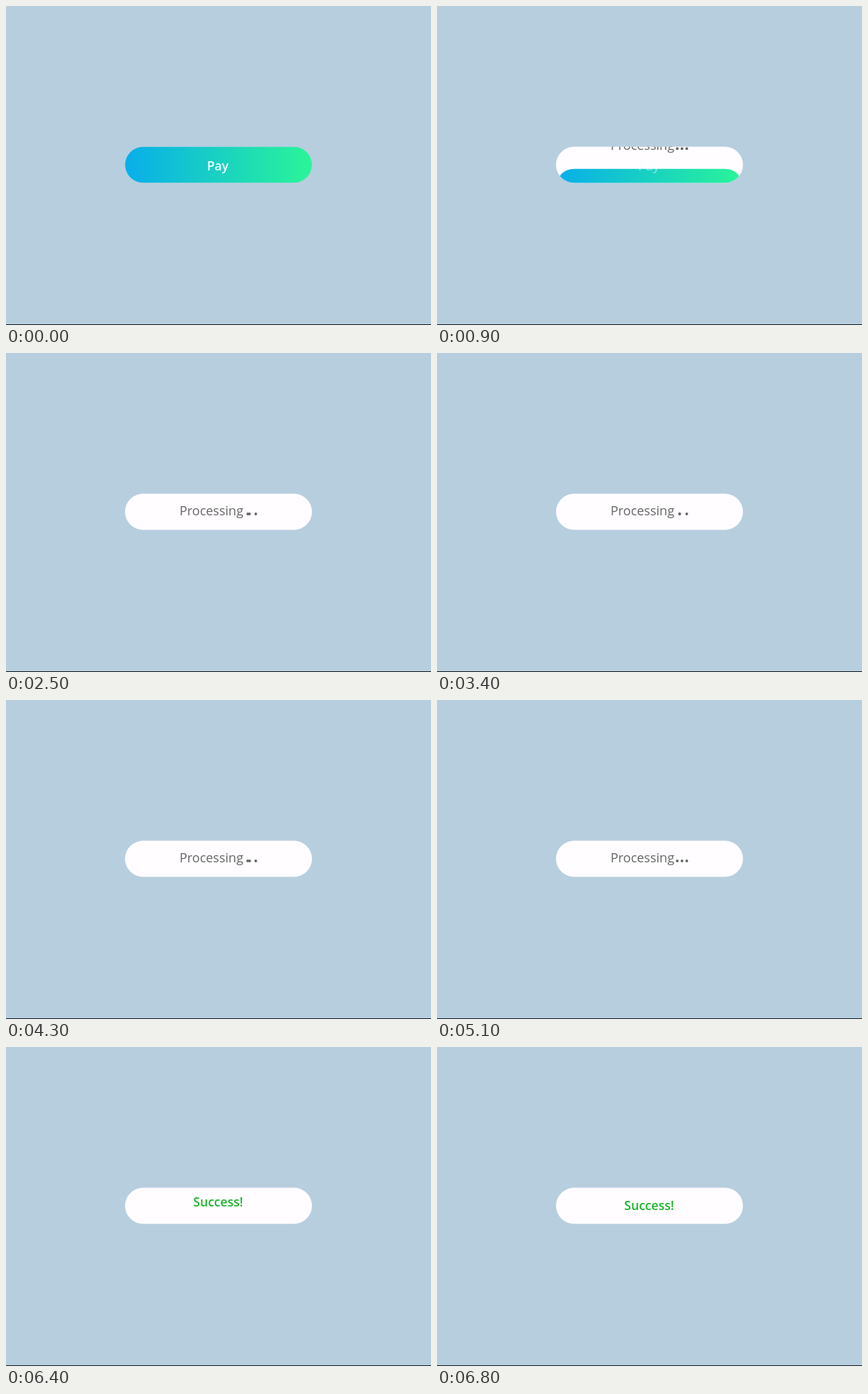
Animation of 600x450 px, one loop 7.9 s. Source, as an HTML page:

```html
<!DOCTYPE html>
<html lang="en">
<head>
<meta charset="utf-8">
<title>Pay button</title>
<style>
  html, body { margin: 0; width: 100%; height: 100%; overflow: hidden; background: #b7cedf; }
  svg { display: block; }
  text { font: 600 17.6px "Open Sans", "Noto Sans", sans-serif; text-anchor: middle; }
  #processing text { font-size: 18px; font-weight: 500; }
</style>
</head>
<body>
<svg width="600" height="450" viewBox="0 0 600 450">
  <defs>
    <linearGradient id="fill">
      <stop offset="0" stop-color="#08aeea"/>
      <stop offset="1" stop-color="#2af598"/>
    </linearGradient>
    <clipPath id="pill"><rect x="168" y="198.5" width="264" height="51" rx="25.5"/></clipPath>
  </defs>
  <rect y="449" width="600" height="1" fill="#101418"/>
  <g clip-path="url(#pill)">
    <rect id="base" x="168" y="198" width="264" height="52" fill="#fffdff"/>
    <rect id="cover" x="168" y="198.5" width="264" height="51" rx="25.5" fill="url(#fill)"/>
    <text id="pay" x="299" y="232" fill="#f3fcff">Pay</text>
    <g id="processing" fill="#666">
      <text x="290" y="229">Processing</text>
      <circle cy="227" r="1.9"/><circle cy="227" r="1.9"/><circle cy="227" r="1.9"/>
    </g>
    <text id="success" x="299.5" y="230" fill="#1db52f">Success!</text>
  </g>
</svg>
<script>
const LOOP = 7900, STEP = 100, TRAVEL = 57;
const DOT_X = [339.2, 345.9, 352.6];
const SWAP_START = 1100, SWAP_TIME = 1000;
const SWAPS = [1, 0, 0, 0]; // left dot of each swapping pair

const [base, cover, pay, processing, success] =
  ["base", "cover", "pay", "processing", "success"].map(id => document.getElementById(id));
const dots = processing.querySelectorAll("circle");

// cubic-bezier(.25, .1, .25, 1)
function ease(x) {
  if (x <= 0) return 0;
  if (x >= 1) return 1;
  const curve = (u, a, b) => 3 * u * (1 - u) ** 2 * a + 3 * u * u * (1 - u) * b + u ** 3;
  let lo = 0, hi = 1;
  for (let i = 0; i < 24; i++) {
    const mid = (lo + hi) / 2;
    if (curve(mid, .25, .25) < x) lo = mid; else hi = mid;
  }
  return curve(lo, .1, 1);
}

const progress = (t, start, duration) => ease((t - start) / duration);
const shift = (el, y) => el.setAttribute("transform", `translate(0 ${y})`);

function draw(t) {
  const enter = progress(t, 800, 315);
  const done = progress(t, 5920, 760);

  base.setAttribute("visibility", enter > 0 ? "visible" : "hidden");
  shift(cover, enter * TRAVEL);
  pay.setAttribute("opacity", 1 - enter);
  shift(processing, (enter - 1 + done) * TRAVEL);
  shift(success, (done - 1) * TRAVEL);

  const xs = [...DOT_X];
  const cycle = Math.floor((t - SWAP_START) / SWAP_TIME);
  const left = SWAPS[cycle];
  if (left !== undefined) {
    const move = progress(t, SWAP_START + cycle * SWAP_TIME, SWAP_TIME) * (xs[left + 1] - xs[left]);
    xs[left] += move;
    xs[left + 1] -= move;
  }
  dots.forEach((dot, i) => dot.setAttribute("cx", xs[i]));
}

const begin = performance.now();
function tick() {
  const t = (performance.now() - begin) % LOOP;
  draw(Math.floor(t / STEP) * STEP);
  requestAnimationFrame(tick);
}
tick();
</script>
</body>
</html>
```
